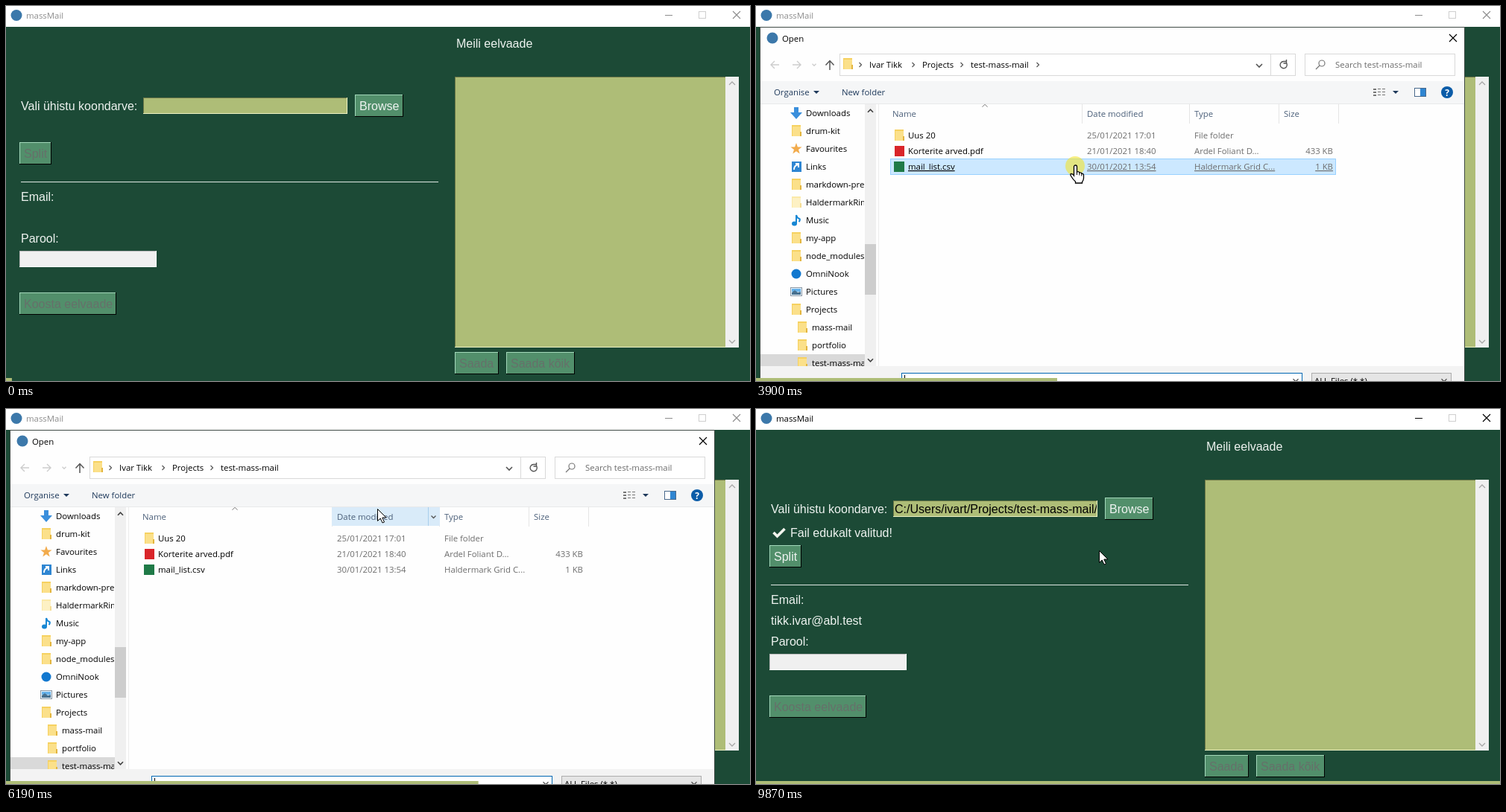
Animation, 998 px wide and 504 px high, one loop 9950 ms. Source, as an HTML page:

```html
<!DOCTYPE html>
<html lang="et">
<head>
<meta charset="utf-8">
<title>massMail</title>
<style>
html, body { margin: 0; width: 100%; height: 100%; overflow: hidden; background: #1c4a36; }
svg { display: block; width: 998px; height: 504px; }
text { white-space: pre; }
.form { font: 16px "Liberation Sans", Arial, sans-serif; fill: #eef3f0; }
.ui { font: 11.4px "Open Sans", "Noto Sans", sans-serif; fill: #000; }
.gray { fill: #6d6d6d; }
.off { fill: #66706a; }
.blue { fill: #1e395b; }
.head { fill: #4c607a; }
.ink { fill: #000; }
.line { fill: none; stroke-width: 1.2; }
#bar { --tone: #8d8d8d; }
#bar.active { --tone: #000; }
#bar text { fill: var(--tone); }
#bar path { stroke: var(--tone); }
.row rect.bg { fill: none; }
.row.hot rect.bg { fill: #e5f3ff; }
.row.sel rect.bg { fill: #cce8ff; stroke: #99d1ff; }
.row.hot text { text-decoration: underline; }
</style>
</head>
<body>
<svg id="stage" viewBox="0 0 998 504"></svg>
<script>
const LOOP = 9950, W = 998, FRAMES = 126;
const GREEN = '#aebd77';

// --- drawing helpers -------------------------------------------------
const rect = (x, y, w, h, fill, more = '') =>
  `<rect x="${x}" y="${y}" width="${w}" height="${h}" fill="${fill}" ${more}/>`;
const frame = (x, y, w, h, fill, stroke) =>
  rect(x + .5, y + .5, w - 1, h - 1, fill, `stroke="${stroke}"`);
const text = (x, y, s, cls = '', more = '') =>
  `<text x="${x}" y="${y}" class="${cls}" ${more}>${s}</text>`;
const line = (d, stroke, width = 1.2) =>
  `<path class="line" d="${d}" stroke="${stroke}" style="stroke-width:${width}"/>`;
const shape = (d, fill) => `<path d="${d}" fill="${fill}"/>`;
const dot = (x, y, r, fill) => `<circle cx="${x}" cy="${y}" r="${r}" fill="${fill}"/>`;
const group = (id, body, more = '') => `<g id="${id}" ${more}>${body}</g>`;
const bevel = (x, y, w, h, fill, light, dark) =>
  rect(x, y, w, h, dark) + rect(x, y, w - 1, h - 1, light) + rect(x + 1, y + 1, w - 2, h - 2, fill);
const chevDown = (x, y, c, s = 4, w = 1.3) => line(`M${x - s} ${y - s / 2}l${s} ${s}l${s} ${-s}`, c, w);
const chevUp = (x, y, c, s = 4, w = 1.3) => line(`M${x - s} ${y + s / 2}l${s} ${-s}l${s} ${s}`, c, w);
const chevRight = (x, y) => line(`M${x - 1.5} ${y - 3}l3 3l-3 3`, '#555');
const triangle = (x, y) => shape(`M${x - 4} ${y - 2}h8l-4 4z`, '#1e395b');
const cross = (x, y) => `M${x - 5} ${y - 5}l10 10m0 -10l-10 10`;
const folder = (x, y, pale) =>
  rect(x, y - 8, 12, 15, pale ? '#fbe9a8' : '#f6d160') +
  rect(x + 1, y - 6, 11, 13, pale ? '#fdf1c4' : '#fbe08a') +
  rect(x + 11, y + 1, 2, 6, pale ? '#f5dd94' : '#e3b53e');

// --- main window -----------------------------------------------------
const button = (x, y, w, label, cls) =>
  bevel(x, y, w, 30, '#528f6b', '#a3d8ba', '#000') + text(x + 6, y + 21, label, cls);

function mainWindow() {
  const title = rect(0, 0, W, 28, '#fff') + dot(14, 12.5, 7.5, '#3c78aa') +
    rect(929.5, 7.5, 9, 9, 'none', 'stroke="#cfcfcf"') +
    group('bar', text(27, 17, 'massMail') +
      `<path class="line" d="M884 12.5h10M${cross(980, 12).slice(1)}"/>`, 'class="ui"');
  const chosen = group('chosen',
    `<text id="path" class="ink" x="186" y="140" clip-path="url(#field)"></text>` +
    group('caret', rect(186, 126, 1, 17, '#000')) +
    `<text id="note" x="46" y="172"></text>` +
    group('bad', line('M24.5 160.500l12 12m0 -12l-12 12', '#f3efdc', 2.4)) +
    group('good', line('M23.500 166l5 5l10 -10', '#f3f5ee', 3.6)) +
    text(20, 290, 'tikk.ivar@abl.test'));
  return rect(0, 0, W, 504, '#1c4a36') + title + group('form',
    text(20, 140, 'Vali ühistu koondarve:') +
    bevel(184, 123, 274, 22, GREEN, '#6c7748', '#eef3c4') +
    button(468, 119, 65, 'Browse') +
    group('splitOff', button(18, 183, 43, 'Split', 'off')) +
    group('splitOn', button(18, 183, 43, 'Split')) +
    rect(20, 236, 560, 1, '#dfe8e3') +
    text(20, 262, 'Email:') + text(20, 318, 'Parool:') +
    bevel(18, 329, 184, 22, '#f0f0f0', '#b9b9b9', '#fff') +
    button(18, 385, 130, 'Koosta eelvaade', 'off') +
    text(604, 56, 'Meili eelvaade') +
    bevel(602, 95, 364, 364, GREEN, '#6c7748', '#eef3c4') +
    rect(965, 95, 18, 364, '#f0f0f0') +
    chevUp(974, 104, '#a8a8a8') + chevDown(974, 451, '#a8a8a8') +
    button(602, 465, 59, 'Saada', 'off') + button(671, 465, 92, 'Saada kõik', 'off') +
    chosen, 'class="form"');
}

// --- file dialog -----------------------------------------------------
const star = (x, y) => {
  let d = '';
  for (let i = 0; i < 10; i++) {
    const r = i % 2 ? 3.2 : 8, a = i * Math.PI / 5;
    d += `${i ? 'L' : 'M'}${(x + r * Math.sin(a)).toFixed(1)} ${(y - r * Math.cos(a)).toFixed(1)}`;
  }
  return shape(d + 'z', '#f2ab4c');
};

const icons = {
  down: y => shape(`M51 ${y - 8}h6v7h5l-8 9l-8 -9h5z`, '#3a8fdc'),
  dir: y => folder(48, y),
  pale: y => folder(48, y, true),
  star: y => star(54, y),
  link: y => rect(48, y - 7, 13, 14, '#2f86d2') +
    line(`M51 ${y + 4}q0 -6 6 -7m-4 -1h4v5`, '#fff', 1.8),
  note: y => `<ellipse cx="51.500" cy="${y + 4.5}" rx="3.500" ry="3" fill="#1787d4"/>` +
    line(`M54 ${y + 4}v-11q1 4 4.500 5q1 2 -1 4`, '#1787d4', 2),
  cloud: y => dot(54, y, 6.5, '#1278cf'),
  pic: y => frame(46, y - 6, 16, 12, '#e9f4fc', '#8b98a5') +
    rect(48, y - 4, 12, 4, '#65b1ea') + shape(`M48 ${y + 4}v-3l4 -3l4 3l4 -1v4z`, '#47708f'),
  sub: y => folder(56, y)
};

const places = [
  ['down', 'Downloads'], ['dir', 'drum-kit'], ['star', 'Favourites'], ['link', 'Links'],
  ['dir', 'markdown-preview'], ['pale', 'HaldermarkRim'], ['note', 'Music'], ['dir', 'my-app'],
  ['dir', 'node_modules'], ['cloud', 'OmniNook'], ['pic', 'Pictures'], ['dir', 'Projects'],
  ['sub', 'mass-mail'], ['sub', 'portfolio'], ['sub', 'test-mass-mail']
];

const files = [
  ['Uus 20', '25/01/2021 17:01', 'File folder', ''],
  ['Korterite arved.pdf', '21/01/2021 18:40', 'Ardel Foliant D...', '433 KB'],
  ['mail_list.csv', '30/01/2021 13:54', 'Haldermark Grid C...', '1 KB']
];
const fileIcons = [y => folder(186, y), y => rect(186, y - 7, 13, 14, '#d9252a'),
  y => rect(185, y - 7, 14, 14, '#1f7a47')];

function fileRow([name, date, kind, size], i) {
  const y = 174 + i * 21;
  return `<g class="row">` +
    `<rect class="bg" x="180.500" y="${y - 10.5}" width="597" height="21"/>` + fileIcons[i](y) +
    text(204, y + 4, name) + text(444, y + 4, date, 'gray') + text(588, y + 4, kind, 'gray') +
    text(774, y + 4, size, 'gray', 'text-anchor="end"') + '</g>';
}

function addressBar() {
  return line('M31 79H20m5 -5l-5 5l5 5M49 79h11m-5 -5l5 5l-5 5', '#cdcdcd', 1.4) +
    chevDown(78, 79, '#cdcdcd', 2.5) +
    line('M99 86V73.500m-5.500 6l5.500 -6l5.500 6', '#555', 1.5) +
    frame(112, 64, 612, 30, '#fff', '#d9d9d9') + rect(690, 65, 1, 28, '#d9d9d9') +
    folder(117, 78) + chevRight(140, 79) + text(152, 83, 'Ivar Tikk') +
    chevRight(211, 79) + text(223, 83, 'Projects') +
    chevRight(276, 79) + text(288, 83, 'test-mass-mail') +
    group('crumb', chevRight(378, 79)) +
    chevDown(675, 80, '#555', 4, 1.6) +
    line('M711.500 76.500a4.600 4.600 0 1 1 -4 -2h4m0 -2.500v5h-4', '#555', 1.4) +
    frame(736, 64, 202, 30, '#fff', '#d9d9d9') +
    `<circle class="line" cx="759" cy="77" r="4" stroke="#777"/>` +
    line('M756 80l-5 5', '#777') + text(777, 83, 'Search test-mass-mail', 'gray');
}

function toolbar() {
  let list = '';
  for (let y = 111; y < 122; y += 4)
    list += rect(828, y, 4, 2, '#777') + rect(834, y, 4, 1, '#777') + rect(840, y, 4, 1, '#777');
  return rect(6, 101, 944, 30, '#f5f6f7') + rect(6, 131, 944, 1, '#e8e9ea') +
    text(24, 120, 'Organise', 'blue') + triangle(81, 116) + text(115, 120, 'New folder', 'blue') +
    list + triangle(858, 116) +
    frame(883, 110, 16, 12, '#fff', '#4a6a8c') + rect(891, 111, 7, 10, '#2f86d2') +
    dot(927, 116, 8, '#0b5ca8') +
    text(927, 120.5, '?', '', 'text-anchor="middle" style="fill:#fff;font-weight:700;font-size:12px"');
}

function tree() {
  const rows = places.map(([kind, label], i) => {
    const y = 144 + i * 24;
    return icons[kind](y) + text(kind === 'sub' ? 75 : 67, y + 4, label);
  }).join('');
  return rect(6, 468, 140, 16, '#d9d9d9') + `<g clip-path="url(#tree)">${rows}</g>` +
    rect(146, 132, 15, 352, '#f0f0f0') + rect(146, 320, 15, 68, '#cdcdcd') +
    chevUp(153.5, 141, '#444', 3.5, 1.7) + chevDown(153.5, 476, '#444', 3.5, 1.7) +
    rect(164, 132, 1, 352, '#ececec');
}

function dialog() {
  const heads = [[183, 'Name'], [444, 'Date modified'], [588, 'Type'], [708, 'Size']];
  return frame(5, 28, 946, 480, '#fefefe', '#3f4a45') +
    dot(22, 43, 7.5, '#3c78aa') + text(35, 48, 'Open') + line(cross(935, 43), '#000') +
    addressBar() + toolbar() + tree() +
    [437, 581, 701, 781].map(x => rect(x, 132, 1, 26, '#e5e5e5')).join('') +
    group('headHot', rect(437, 132, 145, 25, '#d9ebf9') + rect(566, 132, 1, 25, '#a9cfec') +
      chevDown(573.5, 145, '#555', 3)) +
    chevUp(307, 134, '#777', 3.5, 1) +
    heads.map(([x, s]) => text(x, 149, s, 'head')).join('') +
    files.map(fileRow).join('') +
    rect(6, 484, 944, 20, '#f3f3f3') +
    frame(195, 493, 538, 30, '#fff', '#0067b3') + group('nameCaret', rect(199, 496, 1, 10, '#000')) +
    chevDown(724, 503, '#555', 3.5) +
    frame(745, 493, 188, 30, '#e5e5e5', '#adadad') + text(749, 507.5, 'ALL Files (*.*)') +
    chevDown(923, 503, '#555', 3.5);
}

const pointer =
  group('halo', '<circle r="13" fill="#f0e22e" fill-opacity=".6"/>') +
  group('arrow', '<path d="M.5 .5V16.500L4.200 13L7 19L9.500 18L6.800 12H12z" fill="#fff" stroke="#000"/>') +
  group('hand', '<path d="M-1.500 12V1a2 2 0 0 1 4 0v7q3 -1 3.300 1q2.700 -.6 3 1.300q2.700 -.3 2.700 2v4' +
    'q0 3 -2 5.200v1.500h-9v-2q-3 -2.500 -6 -7.500q-1.500 -3 .5 -3q2 0 3.500 2.500z" fill="#fff" stroke="#000" stroke-width="1.3"/>' +
    line('M2.500 8v4M5.800 9v3.500M8.800 10.500v3', '#000', 1));

document.getElementById('stage').innerHTML =
  '<defs><clipPath id="field"><rect x="185" y="124" width="272" height="20"/></clipPath>' +
  '<clipPath id="tree"><rect x="6" y="132" width="139" height="352"/></clipPath></defs>' +
  mainWindow() + group('dialog', dialog(), 'class="ui"') + group('pointer', pointer) +
  rect(0, 500, 8, 4, GREEN, 'id="progress"');

// --- motion ----------------------------------------------------------
const $ = id => document.getElementById(id);
const show = (id, on) => { $(id).style.display = on ? '' : 'none'; };
const within = (n, ...spans) => spans.some(([a, b]) => n >= a && n < b);
const rows = [...document.querySelectorAll('.row')];

const runs = [70, 1090, 2100, 3120, 4140, 5160, 6190, 7250, 8290, 9320, 10342];
function tickAt(t) {
  let r = -1;
  while (r < 9 && t >= runs[r + 1]) r++;
  if (r < 0) return 0;
  const step = (runs[r + 1] - runs[r]) / 13;
  return Math.min(FRAMES - 1, 1 + 13 * r + Math.min(12, Math.floor((t - runs[r] + 8) / step)));
}

// Pointer stops: tick, x, y
const stops = [[9, 917, 498], [13, 790, 386], [19, 520, 158], [22, 506, 140], [32, 506, 140],
  [45, 428, 215], [57, 428, 215], [66, 468, 162], [69, 474, 152], [73, 498, 134],
  [81, 498, 134], [93, 460, 190], [126, 460, 190]];
function pointerAt(n) {
  const i = stops.findIndex(s => s[0] > n);
  const [a, b] = [stops[Math.max(0, i - 1)], stops[i]];
  const k = Math.max(0, (n - a[0]) / (b[0] - a[0])), e = k * k * (3 - 2 * k);
  return [a[1] + (b[1] - a[1]) * e, a[2] + (b[2] - a[2]) * e];
}

function render(t) {
  const n = tickAt(t), [x, y] = pointerAt(n);
  const open = within(n, [30, 52], [79, 103]);
  const second = n >= 79, done = n >= 105;
  const row = open && y >= 163 ? Math.floor((y - 163) / 21) : -1;

  $('progress').setAttribute('width', (n + 1) * W / FRAMES);
  $('bar').classList.toggle('active', within(n, [24, 26], [52, 77], [103, FRAMES]));

  show('chosen', n >= 53);
  show('caret', (t - (done ? 8290 : 4140)) % 900 < 600);
  show('bad', !done);
  show('good', done);
  show('splitOn', done);
  show('splitOff', !done);
  $('path').textContent = 'C:/Users/ivart/Projects/test-mass-mail/' + files[done ? 1 : 2][0];
  $('note').textContent = done ? 'Fail edukalt valitud!' : 'Valitud fail ei ole PDF.';

  show('dialog', open);
  show('crumb', second ? n > 80 : n > 31);
  show('headHot', y > 131 && y < 158);
  show('nameCaret', Math.floor((t - (second ? 6190 : 2335)) / 530) % 2 === 0);
  rows.forEach((el, i) => {
    el.classList.toggle('hot', i === row);
    el.classList.toggle('sel', i === row && within(n, [45, 52], [94, 103]));
  });

  show('pointer', n >= 9);
  $('pointer').setAttribute('transform', `translate(${Math.round(x)} ${Math.round(y)})`);
  show('halo', within(n, [24, 27], [49, 52], [75, 78], [100, 103]));
  show('hand', row >= 0);
  show('arrow', row < 0);
}

const start = performance.now();
(function loop() {
  render((performance.now() - start) % LOOP);
  requestAnimationFrame(loop);
})();
</script>
</body>
</html>
```
